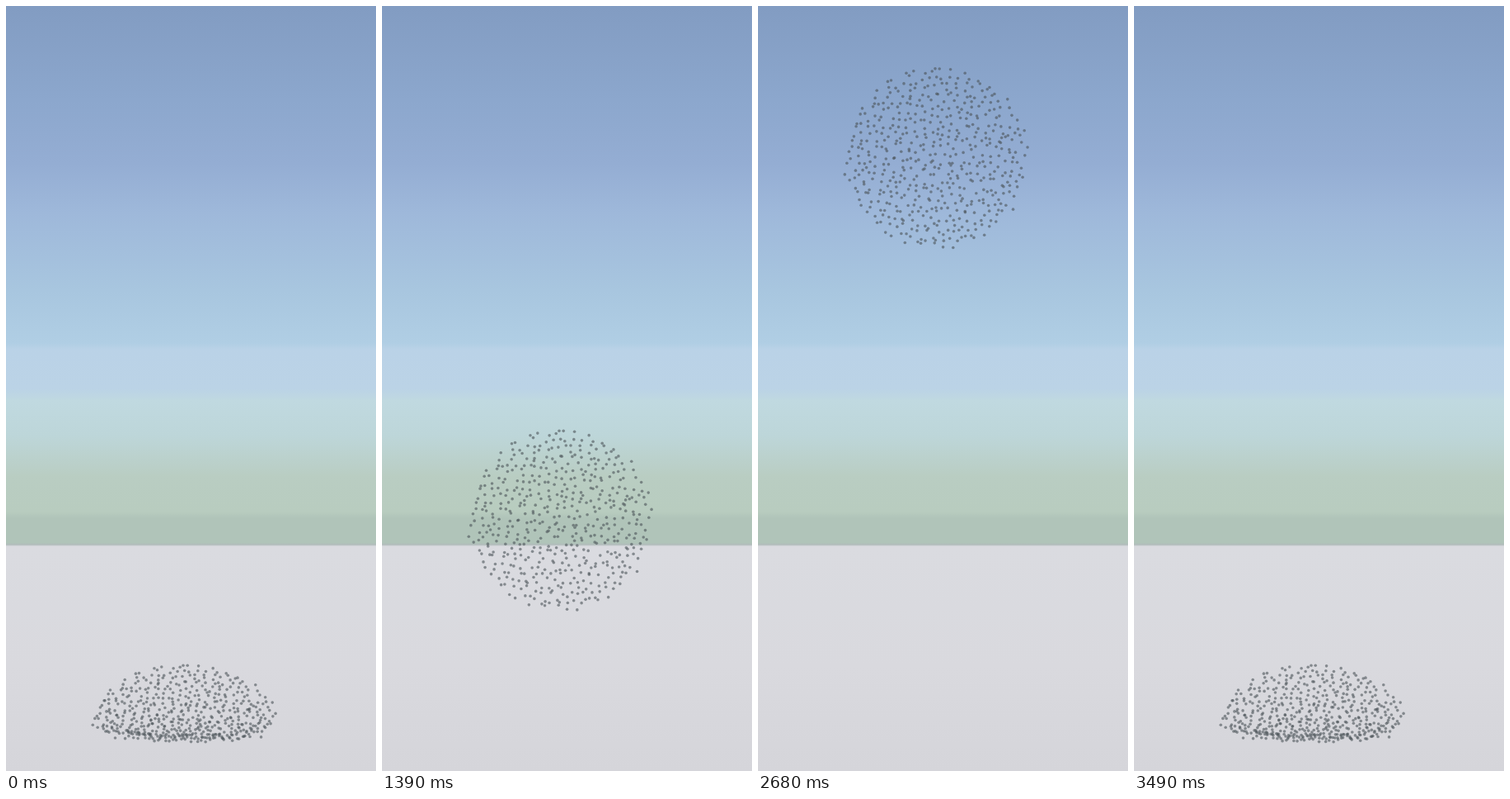
Animation, 449 px wide and 926 px high, one loop 3.64 s. Source, as an HTML page with a canvas:

```html
<!DOCTYPE html>
<html lang="en">
<head>
<meta charset="utf-8">
<title>Falling dots</title>
<style>
  html, body { margin: 0; height: 100%; overflow: hidden; }
  canvas {
    display: block;
    background: linear-gradient(
      #829cc2 0, #8ca7cd 115px, #94add3 190px, #9eb8da 250px,
      #a8c6df 345px, #b0cee4 408px, #bad2e7 416px, #bbd3e6 464px,
      #c0d9e0 478px, #bdd6d9 520px, #b9cdc2 570px, #b8ccbf 612px,
      #b0c4b9 620px, #b0c4b9 650px, #b0bbba 652px, #dadbe0 654px,
      #d9d9de 800px, #d5d5da 926px);
  }
</style>
</head>
<body>
<canvas width="449" height="926"></canvas>
<script>
const ctx = document.querySelector('canvas').getContext('2d');
const LOOP = 3640, STEP = 58;
const COUNT = 520, RADIUS = 110, CENTER_X = 216, START_Y = 112;
const PILE_TOP = 797, PILE_HEIGHT = 94;
const drops = [{ start: 810, phase: 0.65 }, { start: 2440, phase: 0 }];

let seed = 7;
function random() {
  seed = (seed * 16807) % 2147483647;
  return seed / 2147483647;
}
const jitter = size => (random() - 0.5) * size;

// A loosened sunflower spiral fills the ball; each dot has its place in the pile
const dots = Array.from({ length: COUNT }, (_, i) => {
  const r = RADIUS * Math.sqrt(i / COUNT), angle = i * 2.39996;
  const x = CENTER_X + r * Math.cos(angle) + jitter(8);
  const y = r * Math.sin(angle) + jitter(8);
  const depth = (y + RADIUS) / (2 * RADIUS);
  const rest = PILE_TOP + PILE_HEIGHT * Math.sin(Math.PI / 2 * depth)
    - random() * 9 * depth;
  return { x, y, rest };
});

function fallen(t) {
  const drop = drops.findLast(d => t >= d.start);
  if (!drop) return Infinity;
  const n = Math.floor((t - drop.start) / STEP) + drop.phase;
  return 4.5 * n * n;
}

function draw(t) {
  const ballY = START_Y + fallen(t);
  ctx.clearRect(0, 0, 449, 926);
  ctx.fillStyle = 'rgba(75, 84, 89, 0.6)';
  for (const { x, y, rest } of dots) {
    ctx.beginPath();
    ctx.arc(x, Math.min(ballY + y, rest), 1.8, 0, Math.PI * 2);
    ctx.fill();
  }
}

const begin = performance.now();
function frame() {
  draw((performance.now() - begin) % LOOP);
  requestAnimationFrame(frame);
}
frame();
</script>
</body>
</html>
```
